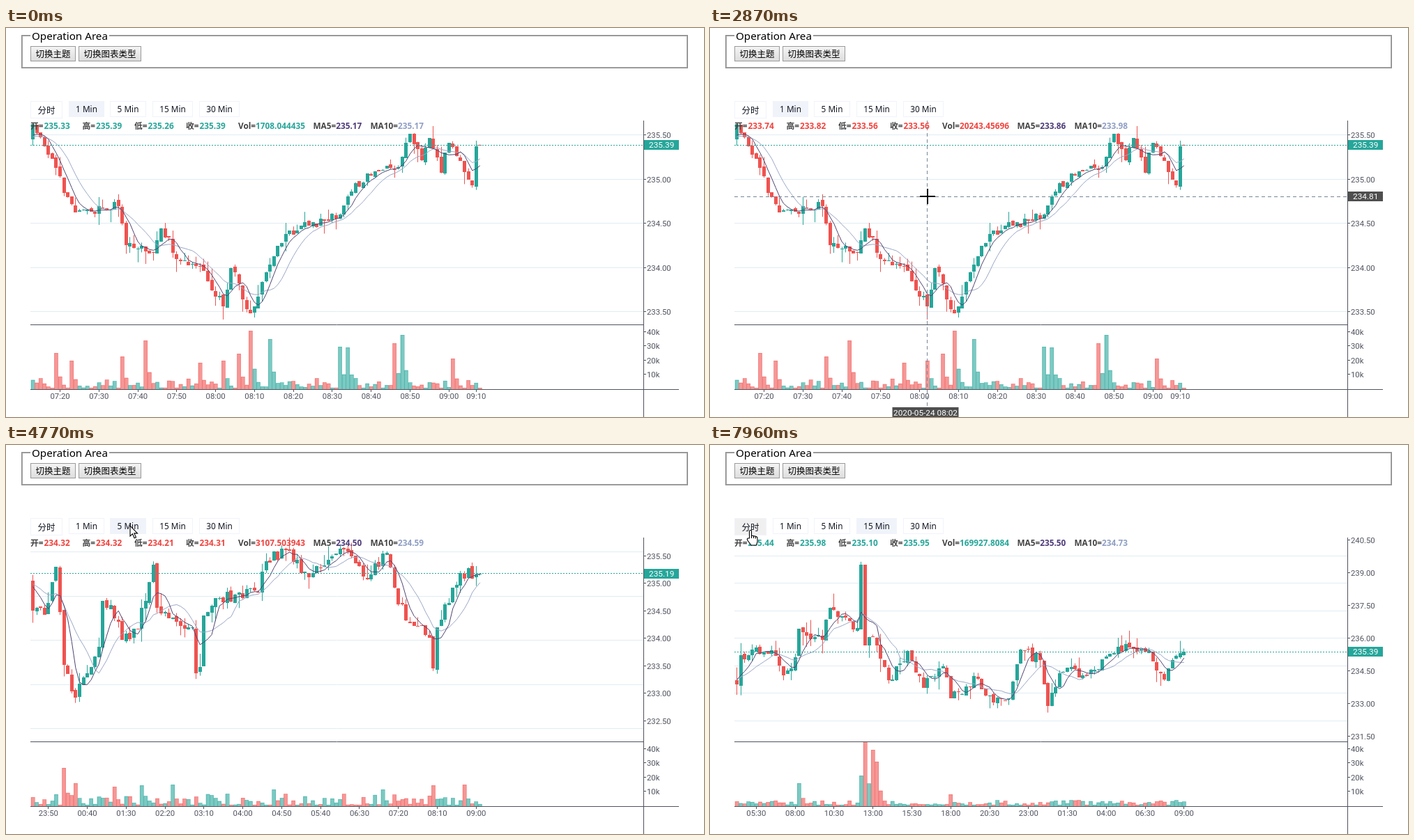
Write an HTML page with a canvas that moves like this. It is 1001 by 559 pixels and loops after 8000 ms.

```html
<!DOCTYPE html>
<html lang="zh">
<head>
<meta charset="utf-8">
<title>K-line chart</title>
<style>
  html, body { margin: 0; height: 100%; overflow: hidden; background: #fff; }
  canvas { display: block; }
</style>
</head>
<body>
<canvas id="stage" width="1001" height="559"></canvas>
<script>
const ctx = document.getElementById('stage').getContext('2d');
const UP = '#26a69a', DOWN = '#ef5350', AXIS = '#50535e', TAG = '#4f4f4f';
const UI = '"Noto Sans", "Noto Sans CJK SC", sans-serif';
const CJK = '"Noto Sans CJK SC", sans-serif';
const NUM = 'Roboto, sans-serif';
const LOOP = 8000, X0 = 38.5, STEP = 5.577, LAST = 115;
const PANE = { left: 35, right: 914, top: 133, split: 426, base: 519, bottom: 559 };

const random = n => { const v = Math.sin(n * 12.9898 + 4.1) * 43758.5453; return v - Math.floor(v); };

// Height of the trend at candle i: straight runs between [candle, y] turning points.
function trendAt(points, i) {
  const next = Math.max(1, points.findIndex(p => p[0] >= i));
  const [i0, y0] = points[next - 1], [i1, y1] = points[next];
  return y0 + (y1 - y0) * (i - i0) / (i1 - i0);
}

// Candles wander around the trend; volume peaks fade out over quiet noise.
function makeChart({ trend, past, rough, peaks, busy, ...rest }) {
  const turns = new Set(trend.map(p => p[0]));
  const noise = (i, k) => random(i * 5 + k + past);
  const closes = Array.from({ length: LAST + 1 }, (_, i) =>
    trendAt(trend, i) + (turns.has(i) ? 0 : (noise(i, 0) - .5) * rough));
  const average = (i, n) => {
    let sum = 0;
    for (let k = i - n + 1; k <= i; k++) sum += closes[k] ?? past;
    return sum / n;
  };
  const candles = closes.map((close, i) => {
    const open = (closes[i - 1] ?? past) + (noise(i, 1) - .5) * 5;
    const tails = peaks.filter(p => p[0] <= i).map(([at, height]) => height * .35 ** (i - at));
    return {
      open, close,
      high: Math.min(open, close) - noise(i, 2) ** 3 * 20,
      low: Math.max(open, close) + noise(i, 3) ** 3 * 20,
      volume: Math.max(2 + noise(i, 4) ** 2 * busy, ...tails),
      ma5: average(i, 5), ma10: average(i, 10),
      color: close <= open ? UP : DOWN
    };
  });
  return { candles, ...rest };
}

const minute = makeChart({
  trend: [[0, 138], [4, 182], [11, 265], [22, 256], [24, 312], [31, 322], [33, 288], [38, 335], [43, 342],
    [49, 400], [51, 345], [56, 410], [61, 340], [65, 296], [79, 268], [82, 235], [88, 206], [94, 200],
    [97, 152], [100, 190], [102, 158], [105, 208], [107, 165], [113, 226], [114, 170], [115, 168.3]],
  past: 158, rough: 15, busy: 14,
  peaks: [[6, 52], [10, 41], [23, 47], [29, 70], [43, 38], [49, 41], [53, 51], [56, 84], [61, 72], [79, 61],
    [81, 60], [93, 66], [95, 78], [108, 44]],
  start: '2020-05-24T07:13Z', minutes: 1, firstLabel: 7,
  topPrice: 235.5, topY: 154, priceStep: .5, labelGap: 63.5, labels: 5
});
const five = makeChart({
  trend: [[0, 238], [3, 244], [6, 175], [8, 316], [11, 363], [17, 290], [18, 224], [20, 230], [23, 280],
    [27, 264], [31, 172], [32, 234], [41, 262], [42, 328], [43, 319], [44, 245], [48, 220], [58, 212],
    [60, 167], [65, 151], [71, 190], [80, 150], [86, 193], [91, 155], [94, 229], [98, 260], [102, 277],
    [103, 321], [104, 262], [110, 184], [115, 184.5]],
  past: 195, rough: 18, busy: 16,
  peaks: [[8, 55], [11, 33], [21, 28], [28, 30], [36, 31], [62, 24], [90, 24], [103, 30], [111, 31]],
  start: '2020-05-23T23:30Z', minutes: 5, firstLabel: 4,
  topPrice: 235.5, topY: 160, priceStep: .5, labelGap: 39.45, labels: 7
});
const quarter = makeChart({
  trend: [[0, 344], [1, 302], [9, 295], [12, 331], [15, 305], [16, 264], [22, 280], [24, 234], [31, 263],
    [32, 172], [33, 288], [35, 276], [39, 338], [44, 296], [48, 349], [53, 318], [55, 364], [62, 336],
    [66, 370], [70, 364], [73, 294], [78, 309], [80, 375], [83, 328], [92, 323], [98, 290], [106, 296],
    [110, 337], [113, 303], [115, 297]],
  past: 336, rough: 16, busy: 7,
  peaks: [[16, 33], [32, 44], [33, 93], [35, 81], [36, 64], [55, 17]],
  start: '2020-05-23T04:15Z', minutes: 15, firstLabel: 5,
  topPrice: 240.5, topY: 137, priceStep: 1.5, labelGap: 47, labels: 7
});
// Grid lines keep the spacing of the chart shown before.
minute.grid = five.grid = minute;
quarter.grid = five;

// Published quotes; other candles are read off their drawn heights.
const quotes = new Map([
  [minute.candles[25], '234.32 234.32 234.21 234.31 3107.503943 234.50 234.59'],
  [minute.candles[49], '233.74 233.82 233.56 233.56 20243.45696 233.86 233.98'],
  [minute.candles[113], '235.10 235.10 234.91 234.93 1682.657758 235.06 235.12'],
  [minute.candles[LAST], '235.33 235.39 235.26 235.39 1708.044435 235.17 235.17'],
  [quarter.candles[6], '235.44 235.98 235.10 235.95 169927.8084 235.50 234.73']
]);
const quoteColor = ([open, , , close]) => +close >= +open ? UP : '#f0443f';

// Pointer moves: from, to, end x, end y; sampled about every 80 ms.
const moves = [
  [530, 1090, 684, 338], [1390, 1470, 680, 332], [1700, 1950, 669, 286.5], [2030, 2270, 520, 262],
  [2480, 2870, 312, 242], [3200, 3600, 178, 147.5], [3670, 3980, 180, 112], [4050, 4050, 178, 116],
  [5380, 5630, 244, 122], [5710, 5790, 239, 118],
  [7260, 7490, 150, 170], [7570, 7720, 72, 138], [7800, 7880, 26, 116], [7960, 7960, 58, 123]];

function pointerAt(t) {
  let x = 655, y = 590;
  for (const [from, to, endX, endY] of moves) {
    if (t < from) break;
    const gaps = Math.round((to - from) / 80);
    const done = gaps ? Math.floor((t - from) / (to - from) * gaps + 1e-6) + 1 : 1;
    const k = Math.min(1, done / (gaps + 1));
    x += (endX - x) * k;
    y += (endY - y) * k;
  }
  return { x, y };
}

const xOf = i => X0 + i * STEP;
const crisp = v => Math.floor(v) + .5;
const between = (t, from, to) => t >= from && t < to;
const priceAt = (chart, y) => (chart.topPrice + (chart.topY - y) / chart.labelGap * chart.priceStep).toFixed(2);
const timeAt = (chart, i) => new Date(Date.parse(chart.start) + i * chart.minutes * 6e4)
  .toISOString().slice(0, 16).replace('T', ' ');

function text(str, x, y, font, color, align = 'left') {
  ctx.font = font;
  ctx.fillStyle = color;
  ctx.textAlign = align;
  ctx.fillText(str, x, y);
}

function box(x, y, w, h, fill, stroke) {
  if (fill) { ctx.fillStyle = fill; ctx.fillRect(x, y, w, h); }
  if (stroke) { ctx.strokeStyle = stroke; ctx.lineWidth = 1; ctx.strokeRect(x + .5, y + .5, w - 1, h - 1); }
}

function line(x1, y1, x2, y2, color, dash = []) {
  ctx.strokeStyle = color;
  ctx.lineWidth = 1;
  ctx.setLineDash(dash);
  ctx.beginPath();
  ctx.moveTo(x1, y1);
  ctx.lineTo(x2, y2);
  ctx.stroke();
  ctx.setLineDash([]);
}

function drawHeader() {
  box(22, 10, 956, 48, null, '#8c8c8c');
  box(23, 11, 954, 46, null, '#a8a8a8');
  box(35, 8, 113, 6, '#fff');
  text('Operation Area', 37, 17, '15.2px ' + UI, '#000');
  for (const [x, w, label] of [[35, 65, '切换主题'], [104, 90, '切换图表类型']]) {
    const shade = ctx.createLinearGradient(0, 26, 0, 48);
    shade.addColorStop(0, '#f5f5f5');
    shade.addColorStop(1, '#dcdcdc');
    box(x, 26, w, 22, shade, '#9a9a9a');
    text(label, x + w / 2, 42, '12.5px ' + CJK, '#000', 'center');
  }
}

const tabs = [[35, 46, 25, '分时'], [90, 51, 23, '1 Min'], [149, 52, 23, '5 Min'],
              [210, 58, 23, '15 Min'], [277, 58, 23, '30 Min']];
const overTab = ({ x, y }) => tabs.findIndex(([left, w, h]) => x >= left && x < left + w && y >= 105 && y < 105 + h);

function drawTabs(active, hovered) {
  tabs.forEach(([x, w, h, label], i) => {
    box(x, 105, w, h, i === active ? '#f0f3fa' : i === hovered ? '#f0f0f0' : '#fff', '#f0f3fa');
    text(label, x + w / 2, i ? 121 : 122.5, (i ? '11.8px ' : '12.5px ') + UI, '#131722', 'center');
  });
}

function drawAverage(candles, key, color) {
  ctx.strokeStyle = color;
  ctx.lineWidth = 1;
  ctx.beginPath();
  candles.forEach((c, i) => ctx.lineTo(xOf(i), c[key]));
  ctx.stroke();
}

function drawCandles(candles) {
  const { left, right, top, base } = PANE;
  ctx.save();
  ctx.beginPath();
  ctx.rect(left, top, right - left, base - top);
  ctx.clip();
  candles.forEach((c, i) => {
    const x = xOf(i), height = Math.max(1, Math.abs(c.close - c.open));
    line(crisp(x), c.high, crisp(x), c.low, c.color);
    box(Math.floor(x) - 2, Math.round(Math.min(c.open, c.close)), 5, Math.round(height), c.color);
    ctx.globalAlpha = .6;
    box(x - STEP / 2, base - c.volume, STEP, c.volume, c.color);
    ctx.globalAlpha = .35;
    box(Math.round(x - STEP / 2), Math.round(base - c.volume), 6, c.volume + 2, null, c.color);
    ctx.globalAlpha = 1;
  });
  drawAverage(candles, 'ma10', '#9ba7c6');
  drawAverage(candles, 'ma5', '#4f4370');
  ctx.restore();
}

function drawTag(str, y, color) {
  box(915, Math.round(y) - 7, 50, 14, color);
  text(str, 922, Math.round(y) + 4, '11.8px ' + NUM, '#fff');
}

function drawChart(chart) {
  const { left, right, top, split, base, bottom } = PANE;
  for (let i = 0; i < chart.grid.labels; i++) {
    const y = crisp(chart.grid.topY + i * chart.grid.labelGap - .5);
    line(left, y, right, y, '#e1ecf2');
  }
  drawCandles(chart.candles);
  line(left, split + .5, right, split + .5, AXIS);
  line(left, base + .5, 965, base + .5, AXIS);
  line(right + .5, top, right + .5, bottom, AXIS);

  const axisLabel = (str, y) => {
    line(right, crisp(y - .5), right + 4, crisp(y - .5), AXIS);
    text(str, 919, y + 4, '11.3px ' + NUM, AXIS);
  };
  for (let i = 0; i < chart.labels; i++)
    axisLabel((chart.topPrice - i * chart.priceStep).toFixed(2), chart.topY + i * chart.labelGap);
  for (let i = 1; i <= 4; i++) axisLabel(i + '0k', 518.5 - i * 20.4);

  const timeLabel = (str, i) => {
    line(crisp(xOf(i)), base, crisp(xOf(i)), base + 4, AXIS);
    text(str, xOf(i), 533, '11.3px ' + NUM, AXIS, 'center');
  };
  for (let i = chart.firstLabel; i <= LAST; i += 10) timeLabel(timeAt(chart, i).slice(11), i);
  if (chart === minute) timeLabel('09:10', LAST - 1);

  const lastY = chart.candles[LAST].close;
  line(left, crisp(lastY), right, crisp(lastY), UP, [2, 2]);
  drawTag(priceAt(chart, lastY), lastY, UP);
}

function drawLegend(chart, candle) {
  const values = quotes.get(candle)?.split(' ') ?? [
    ...['open', 'high', 'low', 'close'].map(k => priceAt(chart, candle[k])),
    (candle.volume / 20.4 * 1e4).toFixed(6),
    priceAt(chart, candle.ma5), priceAt(chart, candle.ma10)];
  const font = 'bold 11.8px ' + UI;
  [['开', 35], ['高', 109.5], ['低', 184], ['收', 258], ['Vol', 333], ['MA5', 440.5, '#4f3b7a'], ['MA10', 522.5, '#8f9fc4']]
    .forEach(([name, x, color = quoteColor(values)], i) => {
      text(name + '=', x, 145, font, '#444');
      text(values[i], x + ctx.measureText(name + '=').width + (i < 4 ? 1 : 0), 145, font, color);
    });
}

function drawCrosshair(chart, index, y) {
  const x = crisp(xOf(index)), { left, right, top, split, base, bottom } = PANE;
  line(x, top, x, bottom, '#758696', [5, 4]);
  if (y < base) {
    line(left, crisp(y), right, crisp(y), '#758696', [5, 4]);
    drawTag(y < split ? priceAt(chart, y) : ((base - y) / 2.04).toFixed(1) + 'k', y, TAG);
  }
  box(x - 50, 545, 95, 14, TAG);
  text(timeAt(chart, index), x - 2.5, 557, '11.8px ' + NUM, '#fff', 'center');
}

const arrow = new Path2D('M0 0V15l3.5-3.3 2.6 6 2.4-1-2.6-5.8H10.5z');
const hand = new Path2D('M-1.5 11V1a1.5 1.5 0 0 1 3 0V7l6 1.3q2.5 .5 2.5 2.7v5l-1.5 5H1L-4.5 13.5q-.5-2.3 1-2.5zM1.5 7v4M4.5 8v3M7.3 8.5v3');
const cross = new Path2D('M-11 0H11M0-11V11');

function drawPointer({ x, y }, shape) {
  ctx.save();
  ctx.translate(Math.round(x), Math.round(y));
  ctx.strokeStyle = '#000';
  ctx.fillStyle = '#fff';
  ctx.lineWidth = shape === cross ? 2 : 1.1;
  if (shape !== cross) ctx.fill(shape);
  ctx.stroke(shape);
  ctx.restore();
}

function draw(t) {
  const chart = t < 4760 ? minute : t < 6630 ? five : quarter;
  const loading = between(t, 4590, 4760) || between(t, 6390, 6630);
  const clicking = between(t, 4210, 4360) || between(t, 6080, 6240);
  const resting = between(t, 4590, 5380) || between(t, 6390, 7260);
  const pointer = pointerAt(t);
  const tab = overTab(pointer);
  const inside = pointer.y > PANE.top && pointer.y < PANE.bottom;
  const index = Math.max(0, Math.min(LAST, Math.round((pointer.x - X0) / STEP)));

  box(0, 0, 1001, 559, '#fff');
  drawHeader();
  drawTabs([minute, five, quarter].indexOf(chart) + 1, tab);
  drawChart(chart);
  if (inside) {
    drawCrosshair(chart, index, pointer.y);
    drawLegend(chart, chart.candles[index]);
  } else if (t < 1000) drawLegend(minute, minute.candles[LAST]);
  else if (t < 7600) drawLegend(minute, minute.candles[25]);
  else drawLegend(quarter, quarter.candles[6]);

  if (loading) {
    box(0, 103, 1001, 456, 'rgba(255,255,255,.6)');
    text('loading...', 500, 343.5, '14.6px ' + UI, '#4a9ae4', 'center');
  }
  if (clicking) {
    ctx.fillStyle = 'rgba(255,255,0,.47)';
    ctx.beginPath();
    ctx.arc(pointer.x, pointer.y, 11.5, 0, 7);
    ctx.fill();
  }
  if (t >= 530) drawPointer(pointer, inside ? cross : tab >= 0 && !resting ? hand : arrow);
}

function frame(now) {
  draw(now % LOOP);
  requestAnimationFrame(frame);
}
requestAnimationFrame(frame);
</script>
</body>
</html>
```
